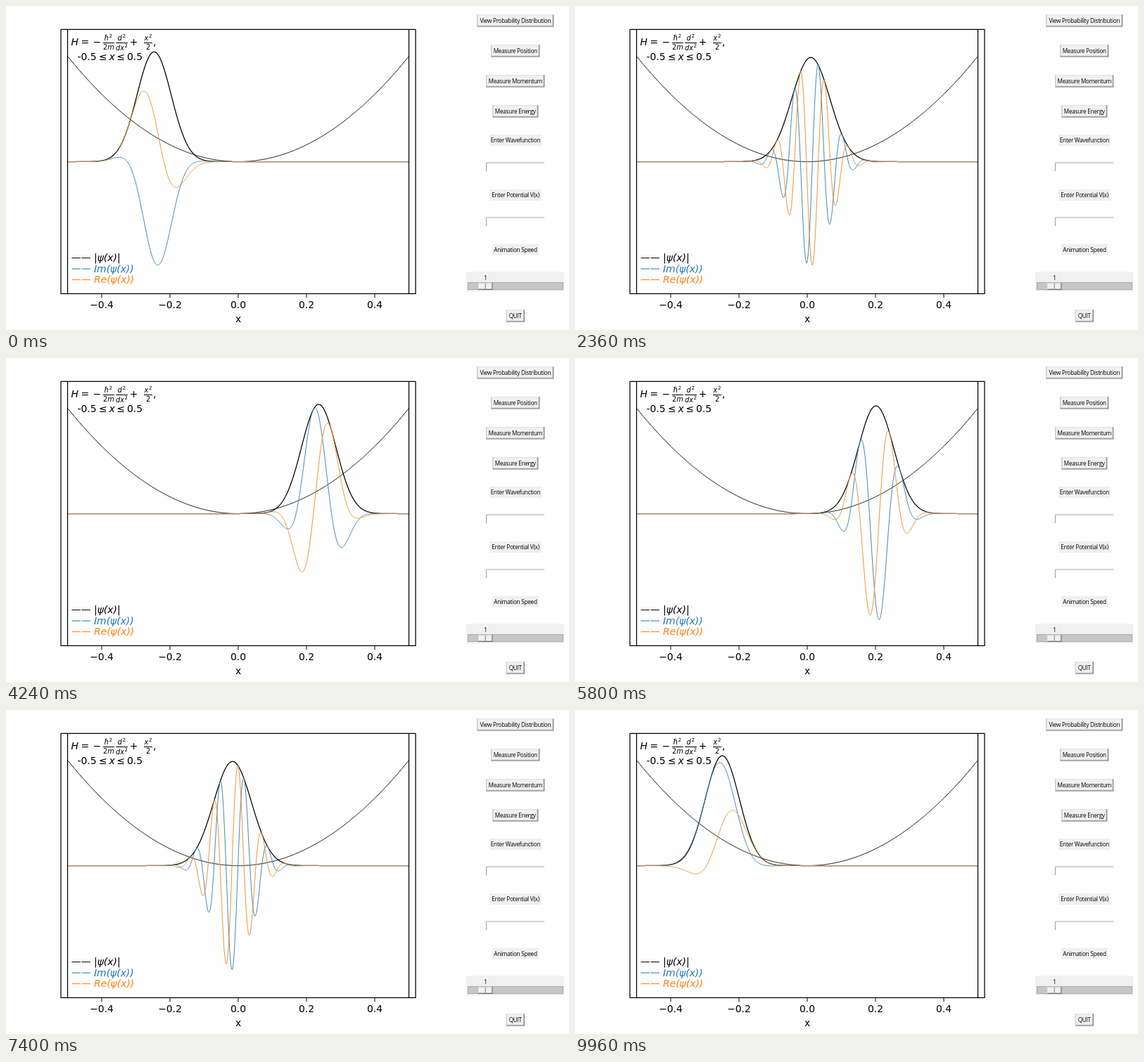
An HTML page that plays this animation: 800x461 px, repeating every 10000 ms.

```html
<!DOCTYPE html>
<html lang="en">
<head>
<meta charset="utf-8">
<title>Wave packet in a harmonic well</title>
<style>
  html, body { margin: 0; width: 100%; height: 100%; overflow: hidden; background: #fefefe; }
  svg { display: block; width: 800px; height: 461px; }
  .plot { font: 13.9px "DejaVu Sans", sans-serif; }
  .small { font-size: 9.8px; }
  .sup { font-size: 7px; }
  .it { font-style: italic; }
  .mid { text-anchor: middle; }
  .panel { font: 8.2px "Open Sans", "Noto Sans", sans-serif; letter-spacing: -.25px; text-anchor: middle; }
  path { fill: none; stroke: #000; stroke-width: 1; stroke-linejoin: round; }
</style>
</head>
<body>
<svg viewBox="0 0 800 461">
  <g class="plot">
    <path id="potential"/>
    <path id="abs" style="stroke-width:1.25"/>
    <path id="im" style="stroke:#4688b8"/>
    <path id="re" style="stroke:#f0943c"/>
    <path d="M78 33.4H582V409.4H78Z M87.5 33.4V409.4 M572.5 33.4V409.4" style="stroke-width:1.25"/>
    <g id="ticks"></g>
    <text class="mid" x="330" y="449.5">x</text>

    <text class="it" x="92.5" y="56">H</text>
    <text x="106.5" y="56">=</text>
    <text x="123.5" y="56">−</text>
    <g class="small">
      <text class="it" x="139.5" y="49">ħ</text><text class="sup" x="146.5" y="45">2</text>
      <text x="138" y="62">2<tspan class="it">m</tspan></text>
      <text class="it" x="158.5" y="49">d</text><text class="sup" x="165.5" y="45">2</text>
      <text class="it" x="156" y="62.5">dx</text><text class="sup" x="168.5" y="58.5">2</text>
      <text class="it" x="196.5" y="49">x</text><text class="sup" x="203" y="45">2</text>
      <text x="199" y="62">2</text>
    </g>
    <path d="M138 52.5H154 M156 52.5H173 M196 52.5H208"/>
    <text x="175.8" y="56">+</text>
    <text x="209" y="56">,</text>
    <text x="101.5" y="77">-0.5</text>
    <text x="132" y="77">≤</text>
    <text class="it" x="146.5" y="77">x</text>
    <text x="157.5" y="77">≤</text>
    <text x="172" y="77">0.5</text>
    <g id="legend" class="it"></g>
  </g>
  <g id="panel" class="panel"></g>
</svg>
<script>
const $ = id => document.getElementById(id);
const X0 = 330, Y0 = 221.5, SCALE = 485;

// Static plot parts
$("ticks").innerHTML = [-0.4, -0.2, 0, 0.2, 0.4].map(v => {
  const x = X0 + v * SCALE, label = v.toFixed(1).replace("-", "−");
  return `<path d="M${x} 410v5"/><text class="mid" x="${x}" y="430">${label}</text>`;
}).join("");

$("legend").innerHTML = [["|ψ(x)|", "#000"], ["Im(ψ(x))", "#1f77b4"], ["Re(ψ(x))", "#ff7f0e"]]
  .map(([label, color], i) => {
    const y = 363 + i * 15.5;
    return `<path d="M93.5 ${y - 4.5}h12.5m1.5 0h12.5" style="stroke:${color}"/>
      <text x="125" y="${y}" fill="${color}">${label}</text>`;
  }).join("");

// Control panel
const rect = (x, y, w, h, fill) => `<rect x="${x}" y="${y}" width="${w}" height="${h}" fill="${fill}"/>`;
const caption = (label, x, y) => `<text x="${x}" y="${y}">${label}</text>`;
const raised = (x, y, w, h) => rect(x, y, w, h, "#6b6b6b") + rect(x, y, w - 1, h - 1, "#e3e3e3") +
  rect(x + 1, y + 1, w - 2, h - 2, "#a8a8a8") + rect(x + 1, y + 1, w - 2.7, h - 2.7, "#f0f0f0");
const button = (label, y, w) => raised(723.8 - w / 2, y, w, 17.5) + caption(label, 723.8, y + 11.8);
const tag = (label, y, w) => rect(724 - w / 2, y, w, 16, "#f0f0f0") + caption(label, 724, y + 11);
const entry = y => `<path d="M682.5 ${y + 12.5}V${y + .5}H765" style="stroke:#a0a0a0"/>`;

$("panel").innerHTML =
  button("View Probability Distribution", 12, 109) +
  button("Measure Position", 55, 69) +
  button("Measure Momentum", 98, 83) +
  button("Measure Energy", 141, 65) +
  tag("Enter Wavefunction", 183, 74) + entry(222.5) +
  tag("Enter Potential V(x)", 261, 73) + entry(300.5) +
  tag("Animation Speed", 338.5, 66) +
  rect(654, 378, 139, 28, "#f0f0f0") + caption("1", 681.5, 390) +
  rect(656, 393, 136, 11, "#a0a0a0") + rect(656.8, 393.8, 134.4, 9.6, "#c6c6c6") +
  raised(671, 393.5, 20.5, 10.5) + rect(680.7, 394.5, 1, 8, "#808080") +
  button("QUIT", 432, 26);

// Curves: f maps position to height in pixels above the axis
function plot(id, f) {
  let d = "";
  for (let px = -242.5; px <= 242.5; px += 1)
    d += (d ? "L" : "M") + (X0 + px) + " " + (Y0 - f(px / SCALE)).toFixed(2);
  $(id).setAttribute("d", d);
}
plot("potential", x => 600 * x * x);

// Squeezed Gaussian packet swinging in the well
const AMP = 0.25, G = 359, VAR_MIN = 0.0025, VAR_MAX = 1 / (G * G * VAR_MIN), HEIGHT = 156.5;

function drawPacket(ms) {
  const lead = 0.031 * Math.exp(-ms / 800); // the swing starts slightly ahead
  const theta = 0.137 + 0.0006273 * ms + lead;
  const sin = Math.sin(theta), cos = Math.cos(theta);
  const center = -AMP * cos, momentum = G * AMP * sin;
  const variance = VAR_MIN * cos * cos + VAR_MAX * sin * sin;
  const chirp = G * (VAR_MAX - VAR_MIN) * sin * cos / variance;
  const peak = HEIGHT * (VAR_MIN / variance) ** 0.25;
  const phase0 = G * AMP * AMP / 4 * Math.sin(2 * theta) + theta / 2 - 3.07;
  const envelope = x => peak * Math.exp(-((x - center) ** 2) / (2 * variance));
  const phase = x => phase0 - momentum * (x - center) - chirp * (x - center) ** 2 / 2;
  plot("abs", envelope);
  plot("im", x => envelope(x) * Math.sin(phase(x)));
  plot("re", x => envelope(x) * Math.cos(phase(x)));
}

// 20 steps per second, shown on a 40 ms grid
function frame() {
  const t = performance.now() % 10000;
  drawPacket(50 * Math.floor((Math.floor(t / 40) * 40 + 19) / 50));
  requestAnimationFrame(frame);
}
frame();
</script>
</body>
</html>
```
